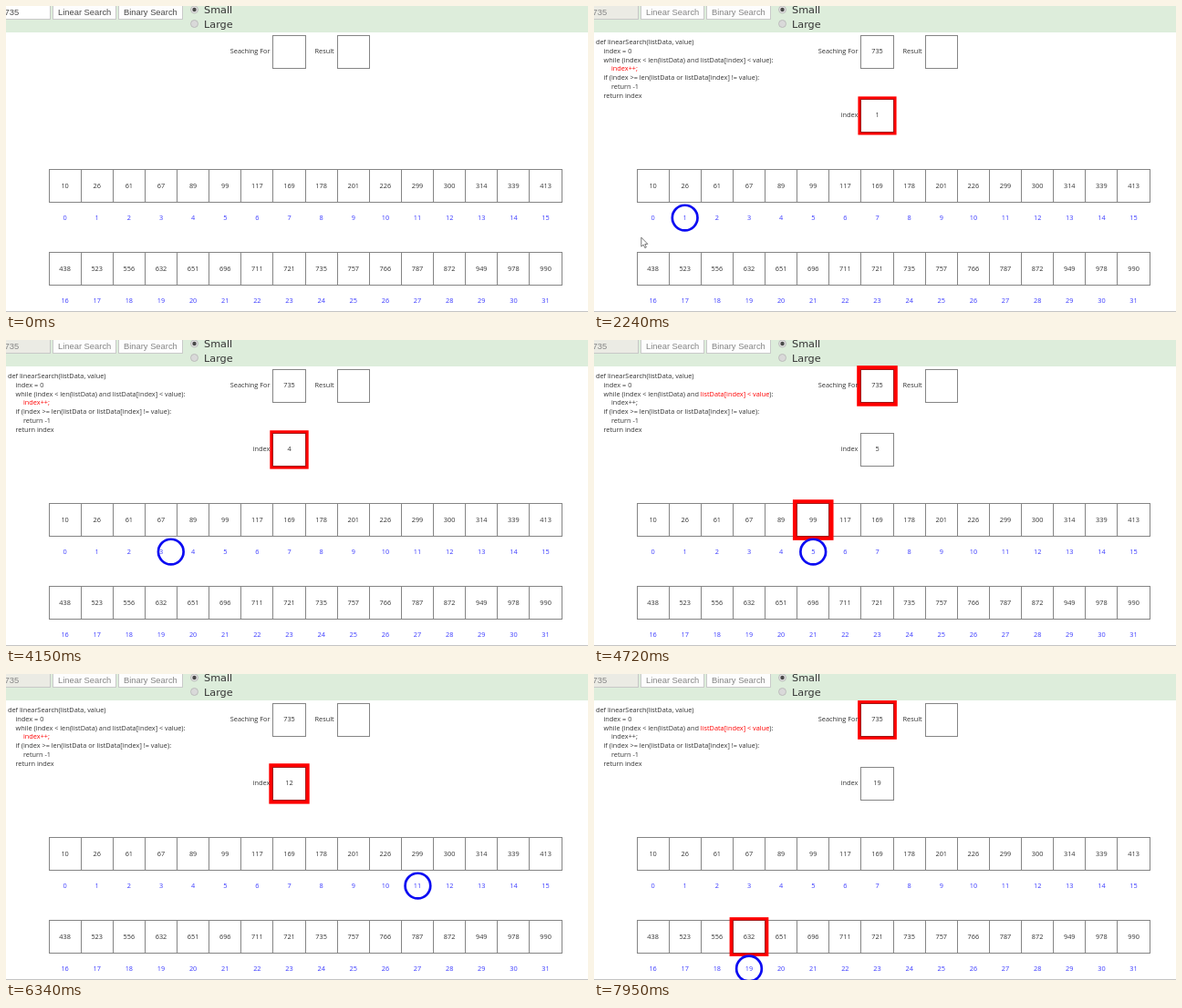
These frames come from a looping animation (638 px wide and 336 px high, 7.99 s). An HTML page with a canvas:

```html
<!DOCTYPE html>
<html lang="en">
<head>
<meta charset="utf-8">
<title>Linear search</title>
<style>
  html, body { margin: 0; width: 100%; height: 100%; overflow: hidden; background: #fff; }
  canvas { display: block; width: 638px; height: 336px; }
</style>
</head>
<body>
<canvas id="stage"></canvas>
<script>
const W = 638, H = 336, LOOP = 7990, START = 1130;
const CELL = 35.13, LEFT = 47.02;
const canvas = document.getElementById('stage');
const ctx = canvas.getContext('2d');
const ratio = window.devicePixelRatio || 1;
canvas.width = W * ratio;
canvas.height = H * ratio;

const SMALL = '7.33px "Open Sans", "Noto Sans", sans-serif';
const FORM = '9.37px "Liberation Sans", Arial, sans-serif';
const RADIO = '11.25px "DejaVu Sans", Verdana, sans-serif';
const INK = '#333', RED = '#f00', BLUE = '#3a3aff';

const data = [10, 26, 61, 67, 89, 99, 117, 169, 178, 201, 226, 299, 300, 314, 339, 413,
  438, 523, 556, 632, 651, 696, 711, 721, 735, 757, 766, 787, 872, 949, 978, 990];

// Each line: indent, then pieces of text; a piece may carry the step that lights it up.
const code = [
  [0, ['def linearSearch(listData, value)']],
  [1, ['index = 0', 'init']],
  [1, ['while (index < len(listData) and '], ['listData[index] < value', 'compare'], ['):']],
  [2, ['index++;', 'advance']],
  [1, ['if (index >= len(listData or listData[index] != value):']],
  [2, ['return -1']],
  [1, ['return index']]
];

// Time to loop count: the search is sped up on the way.
const pace = [[START, 0], [1870, 1], [4100, 4], [5095, 7], [6340, 12], [7212, 17], [7990, 20]];
const pointerX = [[250, -4], [900, 112], [1300, 112], [2240, 52], [2620, -10]];
const pointerY = [[250, 270], [900, 5], [1300, 5], [2240, 254], [2620, 297]];

function along(points, t) {
  let i = 1;
  while (i < points.length - 1 && t > points[i][0]) i++;
  const [t0, a] = points[i - 1], [t1, b] = points[i];
  return a + (b - a) * Math.min(1, Math.max(0, (t - t0) / (t1 - t0)));
}

const cellX = i => LEFT + (i % 16) * CELL;
const cellY = i => i < 16 ? 179.98 : 270.95;
const snap = v => Math.floor(v) + 0.5;

function text(str, x, y, color = INK, align = 'left', font = SMALL) {
  ctx.font = font;
  ctx.fillStyle = color;
  ctx.textAlign = align;
  ctx.fillText(str, x, y);
}

function frame(x, y, w, h, fill, stroke) {
  ctx.fillStyle = fill;
  ctx.strokeStyle = stroke;
  ctx.lineWidth = 1;
  ctx.fillRect(x, y, w, h);
  ctx.strokeRect(x, y, w, h);
}

// Both edges snap to the pixel grid, so neighbouring cells share a line.
function box(x, y, value, glow = 0) {
  if (glow) {
    ctx.fillStyle = RED;
    ctx.fillRect(x - glow, y - glow, CELL + 2 * glow, CELL + 2 * glow);
  }
  const l = snap(x), t = snap(y);
  frame(l, t, snap(x + CELL) - l, snap(y + CELL) - t, '#fff', glow ? '#a01818' : '#858585');
  text(value, x + CELL / 2, y + 19.6, INK, 'center');
}

function disc(x, y, r, fill, stroke, width) {
  ctx.beginPath();
  ctx.arc(x, y, r, 0, 2 * Math.PI);
  if (fill) { ctx.fillStyle = fill; ctx.fill(); }
  if (stroke) { ctx.strokeStyle = stroke; ctx.lineWidth = width; ctx.stroke(); }
}

function toolbar(busy) {
  ctx.fillStyle = '#ddeddb';
  ctx.fillRect(0, 0, W, 29);
  const label = busy ? '#858585' : '#4a4a4a';
  frame(-20, -4.5, 68.5, 19, busy ? '#ebebe4' : '#fff', '#c8c8c8');
  text('735', -1.5, 10, label, 'left', FORM);
  frame(51.5, -4.5, 69, 19, '#fdfdfd', '#cacaca');
  text('Linear Search', 57, 10, label, 'left', FORM);
  frame(123.5, -4.5, 70, 19, '#fdfdfd', '#cacaca');
  text('Binary Search', 129, 10, label, 'left', FORM);
  disc(206.5, 4, 4, '#e2e2e2', '#b4b4b4', 0.8);
  disc(206.5, 4, 2.2, '#4a4a4a');
  disc(206.5, 19.5, 4, '#d9d9d9', '#b4b4b4', 0.8);
  text('Small', 217, 8.3, '#333', 'left', RADIO);
  text('Large', 217, 23.8, '#333', 'left', RADIO);
}

function listing(step) {
  code.forEach(([indent, ...pieces], row) => {
    let x = 2 + indent * 8.5;
    for (const [str, key] of pieces) {
      text(str, x, 41.9 + row * 9.83, key === step ? RED : INK);
      x += ctx.measureText(str).width;
    }
  });
}

function pointer(x, y) {
  ctx.beginPath();
  [[0, 0], [0, 10], [2.3, 8], [4, 11.5], [5.5, 10.8], [4, 7.4], [7, 7.2]]
    .forEach(([dx, dy]) => ctx.lineTo(x + dx, y + dy));
  ctx.closePath();
  ctx.fillStyle = '#fff';
  ctx.fill();
  ctx.strokeStyle = '#555';
  ctx.lineWidth = 0.8;
  ctx.stroke();
}

function draw(t) {
  const busy = t >= START;
  const phase = along(pace, t);
  const index = Math.min(19, Math.floor(phase));
  const part = phase - index;
  const step = !busy ? '' : part >= 0.5 ? 'compare' : index ? 'advance' : 'init';

  // The red frame swells and shrinks as a triangle wave.
  const wave = (((t - 7420) % 1870) + 1870) % 1870;
  const glow = 0.703 * (3.1 + 4.1 * (1 - Math.abs(wave / 935 - 1)));
  const lit = on => step && on ? glow : 0;
  const comparing = step === 'compare';

  ctx.setTransform(ratio, 0, 0, ratio, 0, 0);
  ctx.fillStyle = '#fff';
  ctx.fillRect(0, 0, W, H);
  ctx.fillStyle = '#c4c4c4';
  ctx.fillRect(0, 335, W, 1);
  toolbar(busy);

  data.forEach((value, i) => {
    box(cellX(i), cellY(i), value);
    text(i, cellX(i) + CELL / 2, cellY(i) + 54.9, BLUE, 'center');
  });
  if (comparing) box(cellX(index), cellY(index), data[index], glow);

  box(cellX(7), 32.88, busy ? '735' : '', lit(comparing));
  box(cellX(9), 32.88, '');
  text('Seaching For', 245.8, 52.3);
  text('Result', 338.5, 52.3);

  if (busy) {
    listing(step);
    box(cellX(7), 102.88, index, lit(!comparing));
    text('index', 270.7, 122.4);
    const from = Math.max(0, index - 1), k = Math.min(1, part * 2);
    const x = cellX(from) + (cellX(index) - cellX(from)) * k;
    const y = cellY(from) + (cellY(index) - cellY(from)) * k;
    disc(x + CELL / 2, y + 52.6, 13.85, null, '#0c0cf2', 2.7);
  }
  if (t >= 250 && t < 2620) pointer(along(pointerX, t), along(pointerY, t));
}

const begin = performance.now();
function tick() {
  draw((performance.now() - begin) % LOOP);
  requestAnimationFrame(tick);
}
tick();
</script>
</body>
</html>
```
